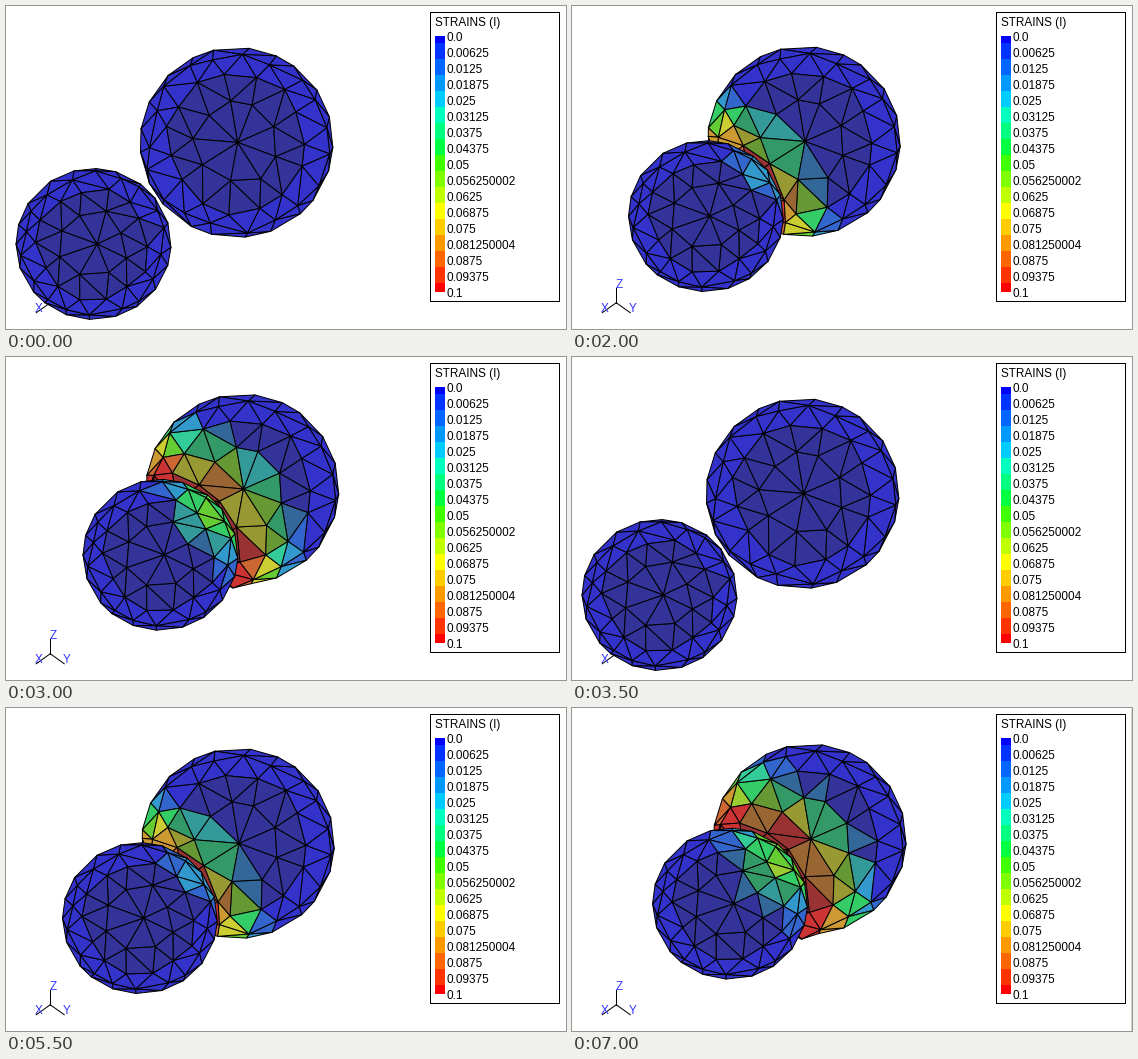
Animation, 560 px wide and 323 px high, one loop 7500 ms. Source, as a matplotlib script:

```python
import numpy as np
import matplotlib.pyplot as plt
from matplotlib.animation import FuncAnimation
from matplotlib.collections import PolyCollection
from matplotlib.patches import Rectangle
from matplotlib.tri import Triangulation

W, H, DPI = 560, 323, 100
PX = 72 / DPI
BANDS = 16
plt.rcParams["font.family"] = "Liberation Sans"

# Load steps: the run plays twice, the second time one step further.
STEPS = [*range(7), *range(8)]


def travel(step):
    """Slowing path of the small ball, and the late drift of the big one."""
    t = np.clip(step - .5, 0, 5.9)
    x = 15.2 * t - .55 * t ** 2
    drift = 7 * (x / 70) ** 4
    return np.array([x, -.6 * x]), np.array([drift, -.75 * drift])


def spectrum(band):
    """Legend colour of a strain band: blue, cyan, green, yellow, red."""
    return np.stack([np.interp(band, [7, 11], [0, 1]),
                     np.interp(band, [0, 5, 11, 16], [0, 1, 1, 0]),
                     np.interp(band, [4, 8], [1, 0])], axis=-1)


def strain(depth, step, gain=1, spread=1):
    """Strain band at a distance from the contact, growing with load."""
    load = np.sqrt(max(step - 1, 0) / 5)
    reach = 70 * spread * load + 1e-9
    near = np.clip(1 - depth / reach, 0, 1)
    return 20 * gain * load * near ** 1.2


class Ball:
    def __init__(self, center, radii, seed, spacing, z):
        self.center, self.radii = np.array(center), np.array(radii)
        rng = np.random.default_rng(seed)
        unit = self.mesh(rng, spacing)
        depth = np.sqrt(np.clip(1 - (unit ** 2).sum(1), 0, 1))
        # Stereographic view, so that the flat triangulation fits the sphere.
        flat = unit / (1 + depth)[:, None]
        self.tri = Triangulation(*flat.T).triangles
        self.pts = self.center + unit * self.radii
        rim = np.hypot(*unit[self.tri].mean(1).T) > .75
        self.light = np.where(rim, .8, .6)[:, None]
        self.grain = rng.uniform(.7, 1.1, len(self.tri))
        self.faces = PolyCollection([], edgecolors="black", linewidths=PX,
                                    zorder=z)
        ax.add_collection(self.faces)

    @staticmethod
    def mesh(rng, spacing):
        """Rings of jittered points from the outline to the middle."""
        rings = []
        for k in range(5):
            r = np.sin(np.pi / 2 - .38 * k)
            n = max(1, round(2 * np.pi * r / spacing))
            turn = (np.arange(n) + rng.uniform(-.2, .2, n) + k / 2) / n
            size = r + rng.uniform(-.05, .05, n) * (k > 0)
            angle = 2 * np.pi * turn
            rings.append(np.c_[size * np.cos(angle), size * np.sin(angle)])
        return np.concatenate(rings)

    def show(self, pts, band):
        shapes = pts[self.tri]
        band = np.clip(np.round(band(shapes.mean(1)) * self.grain), 0, BANDS)
        shade = .2 + spectrum(band) * (self.light - .2)
        self.faces.set_verts(shapes)
        self.faces.set_facecolor(np.round(shade * 5) / 5)


def distance(pts, center):
    return np.hypot(*(pts - center).T)


def dent(pts, center, radius):
    """Push points just under the other ball out to its outline."""
    dist = distance(pts, center)
    hit = (dist > .75 * radius) & (dist < 1.03 * radius)
    scale = np.where(hit, 1.03 * radius / dist, 1)
    return center + (pts - center) * scale[:, None]


def line(xs, ys, **kw):
    # The offsets make straight lines snap to the wanted pixel.
    style = {"color": "black", "lw": PX, **kw}
    return ax.plot(np.add(xs, .25), np.add(ys, .75), **style)[0]


def label(x, y, text, **kw):
    ax.text(x, y, text, fontsize=11.7 * PX, va="baseline", **kw)


def draw_axes():
    for name, x, y, tx, ty in [("Z", 44, 281, 47, 282), ("X", 30, 306, 33, 306),
                               ("Y", 58, 306, 61, 306)]:
        line([44, x], [296, y], zorder=1)
        label(tx, ty, name, color="#3333ff", ha="center", zorder=1)


def draw_legend():
    line([424, 553, 553, 424, 424], [5, 5, 294, 294, 5])
    label(429, 20, "STRAINS (I)")
    # Single precision gives the labels their odd last digits.
    step = np.float32(.1) / np.float32(BANDS)
    for i, value in enumerate(step * np.arange(BANDS + 1, dtype=np.float32)):
        top, end = np.clip([21 + 16 * i, 37 + 16 * i], 30, 286)
        ax.add_patch(Rectangle((429, top), 10, end - top, lw=0,
                               color=spectrum(i), antialiased=False))
        label(440.5, 35 + 16 * i, str(value))


fig = plt.figure(figsize=(W / DPI, H / DPI), dpi=DPI, facecolor="white")
ax = fig.add_axes([0, 0, 1, 1])
ax.set(xlim=(0, W), ylim=(H, 0))
ax.axis("off")
draw_axes()
draw_legend()
big = Ball((230.5, 136.5), (96.5, 95), seed=4, spacing=.3, z=3)
small = Ball((87.5, 238), (77.5, 75.5), seed=9, spacing=.32, z=4)
border = line([559, 559], [0, H], color="#d4d0c8")


def draw(i):
    step = STEPS[i]
    move, drift = travel(step)
    near, far = small.center + move, big.center + drift
    r_near, r_far = small.radii[0], big.radii[0]

    pts = big.pts + drift
    if step > 1:
        pts = dent(pts, near, r_near)
    big.show(pts, lambda p: strain(distance(p, near) - r_near, step))
    small.show(small.pts + move,
               lambda p: strain(distance(p, far) - .4 * r_far, step, .45, .8))
    border.set_visible(step in (2, 7))
    return big.faces, small.faces, border


anim = FuncAnimation(fig, draw, frames=len(STEPS), interval=500,
                     repeat=True, repeat_delay=0)
plt.show()
```
